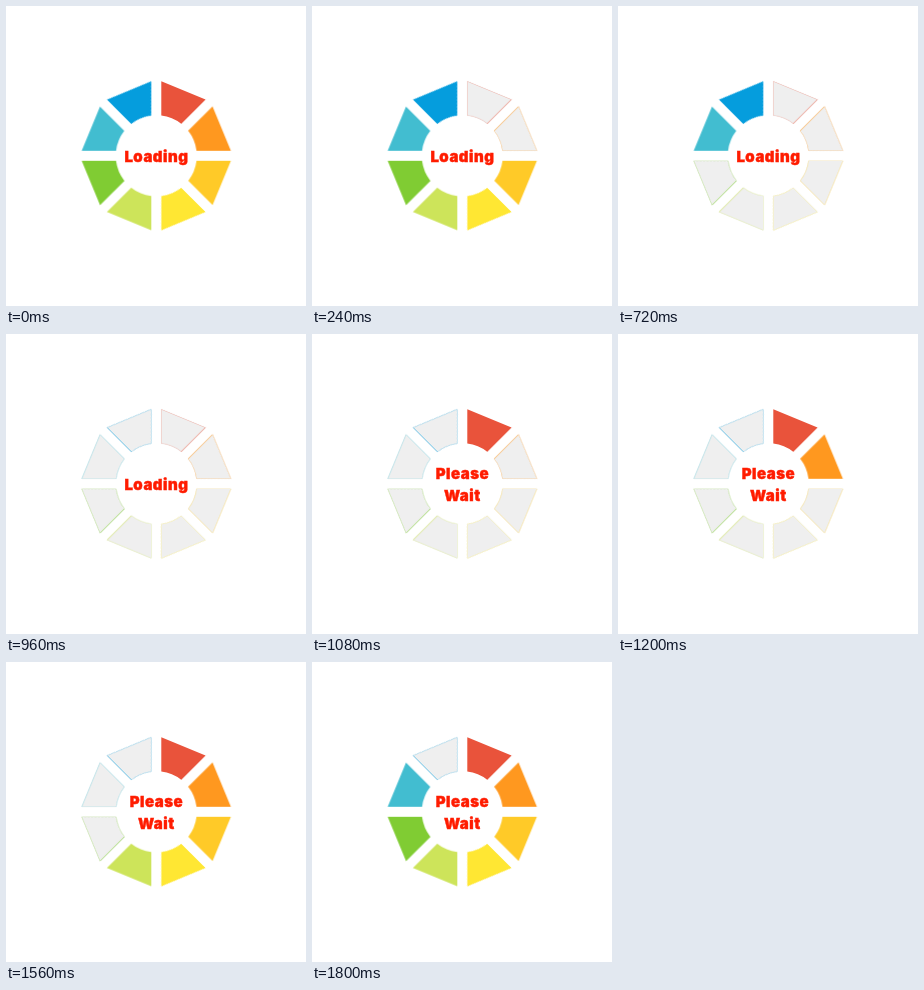
These frames come from a looping animation (300x300 px, 1.92 s). An HTML page without scripts:

```html
<!DOCTYPE html>
<html lang="en">
<head>
<meta charset="utf-8">
<title>Loading</title>
<style>
  html, body { margin: 0; width: 100%; height: 100%; overflow: hidden; background: #fff; }
  svg { display: block; width: 100vw; height: 100vh; }

  .blade { fill: var(--hue); stroke: none; transform: rotate(calc(var(--i) * 45deg)); }
  .off {
    fill: #efefef;
    stroke: #efefef;
    stroke-width: .4;
    animation: off 1920ms step-end calc(var(--i) * 120ms - 1800ms) infinite;
  }
  .edge { stroke: var(--hue); stroke-width: .6; opacity: .6; }

  text {
    font: 900 15px Inter, "Arial Black", sans-serif;
    letter-spacing: .5px;
    text-anchor: middle;
    fill: #ff1c00;
    stroke: #ff1c00;
    stroke-width: .4;
  }
  .loading { animation: first 1920ms step-end infinite; }
  .wait { animation: second 1920ms step-end infinite; }

  @keyframes off { 0% { opacity: 1 } 50%, 100% { opacity: 0 } }
  @keyframes first { 0% { opacity: 1 } 56.25%, 100% { opacity: 0 } }
  @keyframes second { 0% { opacity: 0 } 56.25%, 100% { opacity: 1 } }
</style>
</head>
<body>
<svg viewBox="0 0 300 300">
  <defs>
    <path id="shape" d="M5-74.6 49.2-56.3 24.9-32A40.5 40.5 0 0 0 5-40.2Z"/>
    <path id="start" d="M5-74.6V-40.2"/>
    <path id="end" d="M49.2-56.3 24.9-32"/>
  </defs>

  <g transform="translate(150.3 149.8)">
    <g class="blade" style="--i:0; --hue:#e9533b">
      <use href="#shape"/><use href="#shape" class="off"/><use href="#end" class="edge"/>
    </g>
    <g class="blade" style="--i:1; --hue:#ff981f">
      <use href="#shape"/><use href="#shape" class="off"/><use href="#start" class="edge"/>
    </g>
    <g class="blade" style="--i:2; --hue:#ffca28">
      <use href="#shape"/><use href="#shape" class="off"/>
    </g>
    <g class="blade" style="--i:3; --hue:#ffe733">
      <use href="#shape"/><use href="#shape" class="off"/>
    </g>
    <g class="blade" style="--i:4; --hue:#cde45a">
      <use href="#shape"/><use href="#shape" class="off"/><use href="#end" class="edge"/>
    </g>
    <g class="blade" style="--i:5; --hue:#80cc33">
      <use href="#shape"/><use href="#shape" class="off"/><use href="#start" class="edge"/>
    </g>
    <g class="blade" style="--i:6; --hue:#42bdd0">
      <use href="#shape"/><use href="#shape" class="off"/>
    </g>
    <g class="blade" style="--i:7; --hue:#059ddd">
      <use href="#shape"/><use href="#shape" class="off"/><use href="#start" class="edge"/>
    </g>
  </g>

  <text class="loading" x="150.4" y="156">Loading</text>
  <g class="wait">
    <text x="150.4" y="145">Please</text>
    <text x="150.4" y="167">Wait</text>
  </g>
</svg>
</body>
</html>
```
